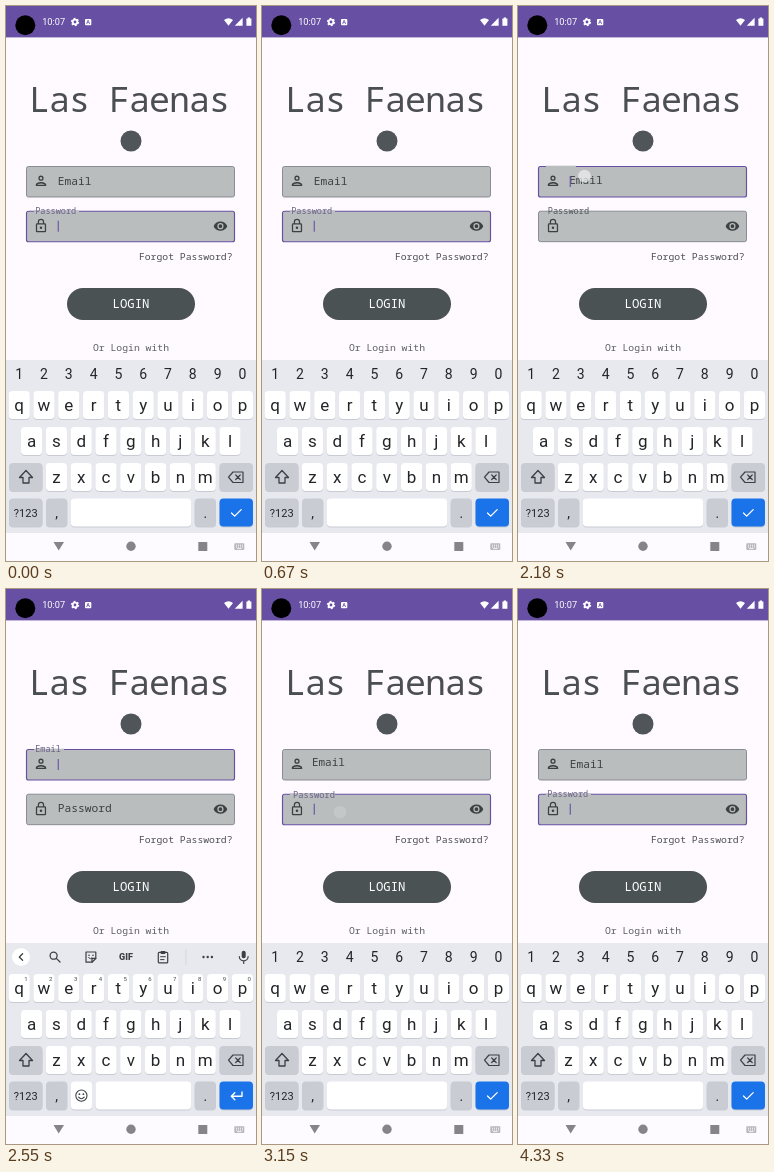
An HTML page that plays this animation: 250x555 px, repeating every 4.39 s.

```html
<!DOCTYPE html>
<html lang="es">
<head>
<meta charset="utf-8">
<title>Login</title>
<style>
html, body { margin: 0; width: 100%; height: 100%; overflow: hidden; background: #fffaff; }
svg { display: block; width: 100%; height: 100%; }
text { font-family: Roboto, sans-serif; }
.mono { font-family: "Noto Sans Mono", "Liberation Mono", monospace; }
.thin { font-weight: 300; }
.mid { text-anchor: middle; }
.line { fill: none; stroke-linecap: round; stroke-linejoin: round; }
</style>
</head>
<body>
<svg id="stage" viewBox="0 0 250 555"></svg>
<script>
const LOOP = 4390, EMAIL_FOCUS = 2165, PASS_FOCUS = 3040, SHIFT = 167;
const PURPLE = '#6750a4', INK = '#3c4043', PAGE = '#fffaff', FIELD = '#b9bdbe';

const rect = (x, y, w, h, fill, r = 0, more = '') =>
  `<rect x="${x}" y="${y}" width="${w}" height="${h}" rx="${r}" fill="${fill}" ${more}/>`;
const circle = (x, y, r, fill, more = '') =>
  `<circle cx="${x}" cy="${y}" r="${r}" fill="${fill}" ${more}/>`;
const text = (x, y, size, str, fill, more = '') =>
  `<text x="${x}" y="${y}" font-size="${size}" fill="${fill}" ${more}>${str}</text>`;
const stroke = (d, color = INK, w = 1.3, more = '') =>
  `<path class="line" d="${d}" stroke="${color}" stroke-width="${w}" ${more}/>`;
const fillPath = (d, fill = INK, more = '') => `<path d="${d}" fill="${fill}" fill-rule="evenodd" ${more}/>`;
const icon = (d, x, y, scale) => fillPath(d, INK, `transform="translate(${x} ${y}) scale(${scale})"`);
const MID = 'class="mid"';

function statusBar() {
  return rect(0, 0, 250, 31.4, PURPLE) + circle(19.3, 19.2, 10, '#000') +
    text(36.2, 19.3, 9.2, '10:07', '#fff') +
    circle(69, 16, 2.3, 'none', 'stroke="#fff" stroke-width="1.8"') +
    circle(69, 16, 3.5, 'none', 'stroke="#fff" stroke-width="1.3" stroke-dasharray="1.83"') +
    rect(79, 13, 6.3, 6.3, '#fff', 1) +
    text(82.1, 18.3, 5.5, 'A', PURPLE, 'class="mid" font-weight="700"') +
    fillPath('M218 14Q222.5 10.5 227 14L222.5 19.8Z', '#fff') +
    fillPath('M228.8 19.7H236.6V11.8Z', '#fff') +
    fillPath('M240.4 12.6H241.8V11.6H244V12.6H245.4V19.8H240.4Z', '#fff');
}

function form() {
  return text(23, 105.8, 35, 'Las Faenas', '#4c4f52', 'class="mono thin" letter-spacing="-1"') +
    circle(125, 135, 10.5, '#505559') +
    field('email', 160, 'Email', 30) + field('pass', 204.7, 'Password', 45) +
    icon('M12 6a2 2 0 110 4 2 2 0 010-4m0 10c2.7 0 5.8 1.29 6 2H6c.23-.72 3.31-2 6-2m0-12a4 4 0 100 8 4 4 0 000-8zm0 10c-2.67 0-8 1.34-8 4v2h16v-2c0-2.66-5.33-4-8-4z',
      27.2, 167, .65) +
    icon('M12 17a2 2 0 100-4 2 2 0 000 4zm6-9h-1V6A5 5 0 007 6v2H6a2 2 0 00-2 2v10a2 2 0 002 2h12a2 2 0 002-2V10a2 2 0 00-2-2zM8.9 6a3.1 3.1 0 016.2 0v2H8.9zM18 20H6V10h12z',
      27.3, 212.2, .64) +
    icon('M12 4.5C7 4.5 2.73 7.61 1 12c1.73 4.39 6 7.5 11 7.5s9.27-3.11 11-7.5c-1.73-4.39-6-7.5-11-7.5zM12 17a5 5 0 110-10 5 5 0 010 10zm0-8a3 3 0 100 6 3 3 0 000-6z',
      207, 212.7, .62) +
    text(132.9, 253.7, 9.75, 'Forgot Password?', '#4b4e51', 'class="mono thin"') +
    rect(61, 282, 128, 32, '#4b5254', 16) +
    text(125, 302.3, 12.3, 'LOGIN', '#fff', 'class="mono mid"') +
    text(125, 344.7, 9.75, 'Or Login with', '#5c5f62', 'class="mono mid thin"');
}

function field(id, y, label, gap) {
  return rect(20.5, y + .5, 208, 30.5, FIELD, 2, `id="${id}Box"`) +
    rect(28, y - .3, gap, 2, FIELD, 0, `id="${id}Gap"`) +
    text(0, 0, 11.25, label, INK, `id="${id}Label" class="mono thin"`) +
    rect(51.7, y + 10, 1.1, 11, PURPLE, 0, `id="${id}Caret"`);
}

const KEY_GREY = '#c9ccd3', GLYPH = '#242528';
const key = (x, y, w, fill = '#fff') =>
  rect(x, y + 1, w, 28, '#c8cbd2', 4) + rect(x, y, w, 28, fill, 4);

function letters(row, x0, y) {
  return [...row].map((c, i) => {
    const x = x0 + i * 24.8;
    return key(x - 10.6, y, 21.2) + text(x, y + 19.6, 17, c, GLYPH, MID);
  }).join('');
}

function keyboard() {
  const digits = [...'1234567890'];
  const big = digits.map((d, i) => text(13.2 + i * 24.8, 373.3, 14, d, GLYPH, MID)).join('');
  const hints = digits.map((d, i) => text(20 + i * 24.8, 392, 6, d, '#444746', MID)).join('');
  return rect(0, 354, 250, 173, '#e7e9ef') +
    letters('qwertyuiop', 13.2, 385) + letters('asdfghjkl', 25.6, 421) + letters('zxcvbnm', 50.4, 457) +
    key(3, 457, 33.5, KEY_GREY) + key(213.5, 457, 33.5, KEY_GREY) +
    stroke('M20 464.5L26.5 471.5H23V477H17V471.5H13.5Z') +
    stroke('M227 466H237V476.5H227L222.5 471.2ZM229.7 469L234.2 473.5M234.2 469L229.7 473.5', INK, 1.2) +
    key(3, 492.5, 33.5, KEY_GREY) + text(19.7, 511, 11, '?123', GLYPH, MID) +
    key(40, 492.5, 21.3, KEY_GREY) + text(50.7, 512, 14, ',', GLYPH, MID) +
    key(188.7, 492.5, 21.3, KEY_GREY) + text(199.4, 512, 14, '.', GLYPH, MID) +
    key(213.5, 492.5, 33.5, '#1a73e8') +
    `<g id="numPad">${big}${key(64.8, 492.5, 120.4)}${stroke('M225.5 507L228.7 510.1L235.2 503.6', '#fff', 1.3)}</g>` +
    `<g id="mailPad">${hints}${toolbar()}${key(64.8, 492.5, 21.3)}${key(89.6, 492.5, 95.6)}` +
    circle(75.4, 506.6, 5.6, 'none', `stroke="${INK}" stroke-width="1.1"`) +
    circle(73.4, 505.2, .9, INK) + circle(77.4, 505.2, .9, INK) + stroke('M72.6 508.2Q75.4 511.4 78.2 508.2', INK, 1.1) +
    stroke('M236 503V507.2H225.3M228.8 503.7L225.3 507.2L228.8 510.7', '#fff', 1.4) + '</g>';
}

function toolbar() {
  return circle(15, 368, 9, '#fff') + stroke('M16.6 364.7L13.3 368L16.6 371.3') +
    circle(47.6, 366.7, 3.5, 'none', `stroke="${INK}" stroke-width="1.3"`) + stroke('M50.3 369.4L54 373') +
    stroke('M80 363H89.8V369.5L86 373.2H80Z', INK, 1.2) + stroke('M89.8 369.3H86V373') +
    circle(83, 366.3, .8, INK) + circle(87, 366.3, .8, INK) + stroke('M82.6 368.7Q84.5 370.7 86 369', INK, 1) +
    text(120, 371.3, 9, 'GIF', INK, 'class="mid" font-weight="900"') +
    rect(152.3, 363.3, 9.4, 10.6, 'none', 1, `stroke="${INK}" stroke-width="1.2"`) +
    rect(154.6, 362, 4.8, 3, INK, .8) + stroke('M154.6 367.7H159.4M154.6 370.6H158', INK, 1) +
    rect(179.5, 360, .8, 16, '#d0d3d9') +
    [197.5, 201.7, 205.9].map(x => circle(x, 368, 1.2, INK)).join('') +
    rect(235.7, 361.7, 4, 7.6, INK, 2) + stroke('M233.3 367.5A4.4 4.4 0 0 0 242.1 367.5M237.7 372V374.4', INK, 1.2);
}

function navBar() {
  const grey = '#868489';
  const dots = [230, 232, 234, 236].map(x => rect(x, 538.7, 1, 1, '#fff') + rect(x, 540.6, 1, 1, '#fff')).join('');
  return rect(0, 527, 250, 28, '#fdfbff') +
    fillPath('M47.5 536H58L52.7 544.5Z', grey) + circle(125, 540.3, 4.7, grey) +
    rect(192.3, 536, 9, 9, grey, .6) +
    rect(228.3, 537.3, 10, 6.6, '#b9b7bc', .8) + dots + rect(231, 542.3, 4.6, .8, '#fff');
}

const stage = document.getElementById('stage');
stage.innerHTML = rect(0, 0, 250, 555, PAGE) + statusBar() + form() + keyboard() + navBar() +
  circle(0, 0, 6.3, '#eeeeef', 'id="tap"');

const el = id => document.getElementById(id);
const set = (id, attrs) => { for (const k in attrs) el(id).setAttribute(k, attrs[k]); };
const show = (id, on) => set(id, { visibility: on ? 'visible' : 'hidden' });
const clamp = v => Math.max(0, Math.min(1, v));

// cubic-bezier(.4, 0, .2, 1)
function ease(p) {
  if (p <= 0 || p >= 1) return clamp(p);
  let lo = 0, hi = 1, u = .5;
  for (let i = 0; i < 20; i++) {
    u = (lo + hi) / 2;
    const x = 3 * (1 - u) ** 2 * u * .4 + 3 * (1 - u) * u * u * .2 + u ** 3;
    if (x < p) lo = u; else hi = u;
  }
  return 3 * (1 - u) * u * u + u ** 3;
}

function drawField(id, y, focused, raised, caret) {
  set(id + 'Box', { stroke: focused ? PURPLE : '#80858a', 'stroke-width': focused ? 1.15 : .9 });
  show(id + 'Gap', focused);
  show(id + 'Caret', focused && caret);
  const x = 51.7 - 22.5 * raised, base = y + 18.7 - 15.7 * raised, scale = 1 - .24 * raised;
  set(id + 'Label', {
    transform: `translate(${x} ${base}) scale(${scale})`,
    fill: raised < .5 ? INK : focused ? '#6a6088' : '#55585b'
  });
}

const TAPS = [
  { x: 66.5, y: 170, from: 2080, up: 2190, gone: 2340 },
  { x: 78, y: 223.3, from: 2840, up: 3040, gone: 3200 }
];

function render(t) {
  const onEmail = t >= EMAIL_FOCUS && t < PASS_FOCUS;
  const raised = ease((t - EMAIL_FOCUS) / SHIFT) - ease((t - PASS_FOCUS) / SHIFT);
  // the caret blinks from the moment its field gains focus
  const focusedAt = t < EMAIL_FOCUS ? -400 : onEmail ? EMAIL_FOCUS : PASS_FOCUS;
  const caret = (t - focusedAt) % 1000 < 500;
  drawField('email', 160, onEmail, raised, caret);
  drawField('pass', 204.7, !onEmail, 1 - raised, caret);

  const mailKeys = t >= 2250 && t < 3110;
  show('mailPad', mailKeys);
  show('numPad', !mailKeys);

  const tap = TAPS.find(p => t >= p.from && t < p.gone);
  show('tap', !!tap);
  if (tap) set('tap', { cx: tap.x, cy: tap.y, opacity: .72 * (1 - clamp((t - tap.up) / (tap.gone - tap.up))) });
}

const start = performance.now();
function tick() {
  render((performance.now() - start) % LOOP);
  requestAnimationFrame(tick);
}
tick();
</script>
</body>
</html>
```
